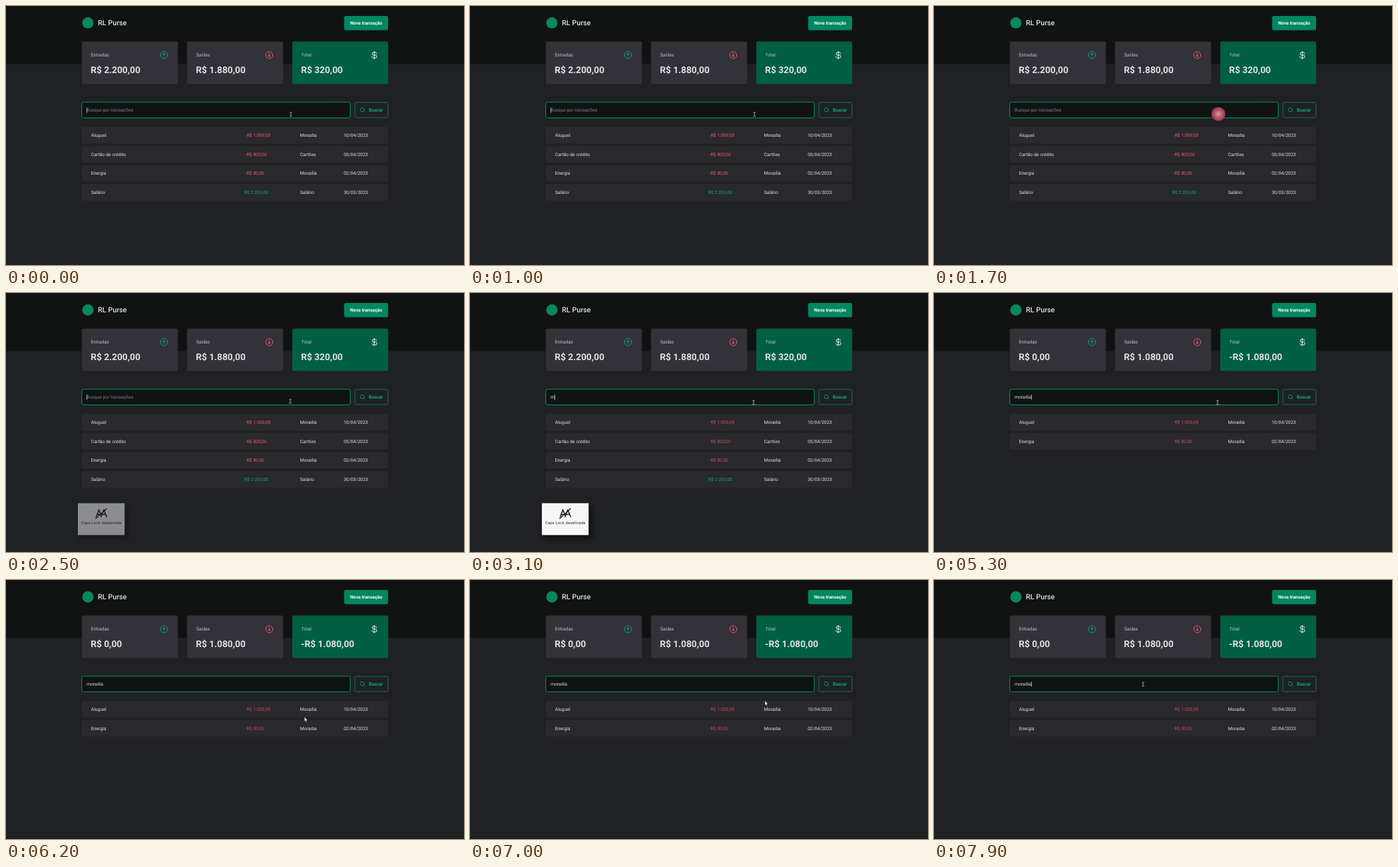
Animation, 688 px wide and 390 px high, one loop 8000 ms. Source, as an HTML page:

```html
<!DOCTYPE html>
<html lang="pt-BR">
<head>
<meta charset="utf-8">
<title>Finanças</title>
<style>
  html, body { margin: 0; width: 100%; height: 100%; overflow: hidden; background: #202124; }
  svg { display: block; width: 100vw; height: 100vh; }
  text { font: 400 6.866px Roboto, sans-serif; fill: #e1e1e6; text-rendering: geometricPrecision; white-space: pre; }
  .bold { font-weight: 700; }
  .value { font-size: 13.73px; font-weight: 700; }
  .label { fill: #c4c4cc; }
  .line { fill: none; stroke-linecap: round; stroke-linejoin: round; }
</style>
</head>
<body>
<svg id="stage" viewBox="0 0 688 390" preserveAspectRatio="none">
  <defs>
    <radialGradient id="press">
      <stop offset="0" stop-color="#c9a0a2"/>
      <stop offset=".4" stop-color="#bd6672"/>
      <stop offset=".85" stop-color="#a83e50"/>
      <stop offset="1" stop-color="#a83e50" stop-opacity=".5"/>
    </radialGradient>
    <filter id="soft" x="-30%" y="-30%" width="160%" height="160%">
      <feGaussianBlur stdDeviation="3"/>
    </filter>
  </defs>
  <rect width="688" height="390" fill="#202124"/>
  <rect width="688" height="87.5" fill="#111313"/>

  <circle cx="123" cy="25.5" r="8.5" fill="#07865f"/>
  <text x="138" y="29.3" style="font-size:10.8px;font-weight:500">RL Purse</text>
  <rect x="508" y="15" width="66" height="21.4" rx="2.5" fill="#00875f"/>
  <text class="bold" x="541" y="28.3" text-anchor="middle" style="fill:#fff">Nova transação</text>

  <g id="cards"></g>
  <g class="line" stroke-width=".95">
    <g stroke="#00b37e">
      <circle cx="237.5" cy="74" r="5.3"/>
      <path d="M237.5 76.4V71.6M235.4 73.6l2.1-2.1 2.1 2.1"/>
    </g>
    <g stroke="#f75a68">
      <circle cx="395.5" cy="74" r="5.3"/>
      <path d="M395.5 71.6v4.8M393.4 74.4l2.1 2.1 2.1-2.1"/>
    </g>
    <path stroke="#fff" d="M553.2 68.4v11.2M556.6 71.9a2.2 2.2 0 0 0-2.2-2.1h-2.2a2.05 2.05 0 0 0 0 4.1h2.6a2.15 2.15 0 0 1 0 4.3h-3a2.2 2.2 0 0 1-2.2-2.1"/>
  </g>

  <rect x="113.8" y="144.8" width="403.4" height="23.6" rx="2.5" fill="#111313" stroke="#00a876" stroke-width=".9"/>
  <text id="query" x="120.9" y="159"></text>
  <rect id="caret" y="153" width=".7" height="7.8" fill="#e1e1e6"/>

  <g id="search">
    <rect x="524" y="145.2" width="49.8" height="22.8" rx="2.5" fill="none" stroke="#008f66" stroke-width=".75"/>
    <g class="line" stroke="#00b37e" stroke-width=".75">
      <circle cx="535" cy="156.2" r="2.9"/>
      <path d="M537.1 158.3l1.7 1.7"/>
    </g>
    <text class="bold" x="545" y="159" style="fill:#00b37e">Buscar</text>
  </g>

  <g id="rows"></g>

  <g id="popup">
    <rect x="111" y="320" width="73" height="50" fill="#000" opacity=".45" filter="url(#soft)"/>
    <rect x="108" y="316.5" width="70.2" height="48" fill="#f6f6f7"/>
    <g class="line" stroke="#161616" stroke-width="1.5">
      <path d="M135.5 336.8l4.1-10.4 3.6 9.6M142.8 337l4.1-10.6 4.2 10.6M137 333.6h4.6M144.5 333.6h5"/>
      <path d="M134.8 339.6l16.4-14.8" stroke-width="1.3"/>
    </g>
    <text x="143" y="348" text-anchor="middle" style="font:400 5.8px Inter,sans-serif;fill:#222">Caps Lock desativada</text>
  </g>

  <g id="cursor">
    <path id="beam" class="line" stroke="#d0d0d0" stroke-width=".75" d="M-1.5-3q1.5 0 1.5.8q0-.8 1.5-.8M0-2.2v4.4M-1.5 3q1.5 0 1.5-.8q0 .8 1.5.8"/>
    <path id="arrow" d="M0 0v6.6l1.5-1.4 1 2.4 1.1-.5-1-2.3h2.1z" fill="#fff" stroke="#111" stroke-width=".4"/>
  </g>
  <circle id="click" cx="427.2" cy="162.6" r="10.7" fill="url(#press)"/>
</svg>
<script>
const LOOP = 8000, STEP = 100;
const $ = id => document.getElementById(id);
const show = (el, on) => el.setAttribute('visibility', on ? 'visible' : 'hidden');

function add(parent, tag, attrs, text = '') {
  const el = document.createElementNS('http://www.w3.org/2000/svg', tag);
  for (const key in attrs) el.setAttribute(key, attrs[key]);
  el.textContent = text;
  return parent.appendChild(el);
}

const values = ['Entradas', 'Saídas', 'Total'].map((label, i) => {
  const x = 114 + i * 158;
  add($('cards'), 'rect', { x, y: 53.6, width: 144.2, height: 64, rx: 2.5, fill: i < 2 ? '#323238' : '#015f43' });
  add($('cards'), 'text', { x: x + 13.7, y: 76.4, class: 'label' }, label);
  return add($('cards'), 'text', { x: x + 13.2, y: 100.9, class: 'value' });
});

const totals = {
  all: ['R$ 2.200,00', 'R$ 1.880,00', 'R$ 320,00'],
  found: ['R$ 0,00', 'R$ 1.080,00', '-R$ 1.080,00']
};

const records = [
  ['Aluguel', '- R$ 1.000,00', 'Moradia', '10/04/2023'],
  ['Cartão de crédito', '- R$ 800,00', 'Cartões', '05/04/2023'],
  ['Energia', '- R$ 80,00', 'Moradia', '02/04/2023'],
  ['Salário', 'R$ 2.200,00', 'Salário', '30/03/2023']
];
const columns = [127.7, 357.8, 441.7, 507.2];
const rows = records.map(cells => {
  const g = add($('rows'), 'g', {});
  add(g, 'rect', { x: 114, y: 182, width: 460, height: 25.2, rx: 2.5, fill: '#29292e' });
  const texts = cells.map((cell, i) => add(g, 'text', { x: columns[i], y: 196.9 }, cell));
  return { g, cells, price: texts[1] };
});

const word = 'moradia';
const keyTimes = [3000, 3400, 3500, 3700, 4000, 4100, 4300];
const blinks = [500, 1000, 1500, 2100, 2600, 3000, 4800, 5300, 5800, 6300, 6800, 7400];

// [time, x, y]
const path = [
  [0, 428, 163], [1500, 427, 163], [2900, 427, 163], [3000, 426, 165], [5800, 426, 165],
  [6100, 447, 196], [6400, 452, 236], [6700, 447, 222], [7000, 443, 182],
  [7200, 449, 214], [7350, 452, 226], [7500, 449, 184], [7800, 322, 159], [7900, 314, 157], [8000, 314, 157]
];

function pointer(t) {
  const i = path.findIndex(p => p[0] > t);
  const [a, b] = [path[i - 1], path[i]];
  const k = (t - a[0]) / (b[0] - a[0]);
  const ease = k * k * (3 - 2 * k);
  return [1, 2].map(n => a[n] + (b[n] - a[n]) * ease);
}

function render(now) {
  const t = Math.floor((now % LOOP) / STEP) * STEP;
  const found = t >= 5300;

  totals[found ? 'found' : 'all'].forEach((v, i) => { values[i].textContent = v; });

  const dull = found || (t >= 3000 && t < 4500);
  let slot = 0;
  for (const { g, cells, price } of rows) {
    const visible = !found || cells[2] === 'Moradia';
    show(g, visible);
    if (visible) g.setAttribute('transform', `translate(0 ${28.65 * slot++})`);
    price.style.fill = cells[1][0] !== '-' ? '#00b37e' : dull ? '#c94f5c' : '#f75a68';
  }

  const typed = word.slice(0, keyTimes.filter(k => k <= t).length);
  const query = $('query');
  query.textContent = typed || 'Busque por transações';
  query.style.fill = typed ? '#e1e1e6' : '#7c7c8a';
  $('caret').setAttribute('x', 121 + (typed ? query.getComputedTextLength() : 0));
  show($('caret'), blinks.filter(b => b <= t).length % 2 === 0);

  $('search').setAttribute('opacity', t >= 4500 && !found ? 0.6 : 1);

  const popup = t < 2500 || t >= 4800 ? 0 : t < 2600 ? 0.5 : t < 2800 ? 0.92 : 1;
  $('popup').setAttribute('opacity', popup);

  const [x, y] = pointer(t);
  const overInput = x < 517 && y > 144 && y < 169;
  $('cursor').setAttribute('transform', `translate(${x} ${y})`);
  show($('beam'), overInput);
  show($('arrow'), !overInput);
  show($('click'), t >= 1600 && t < 1800);
}

const start = performance.now();
function tick() {
  render(performance.now() - start);
  requestAnimationFrame(tick);
}
tick();
</script>
</body>
</html>
```
